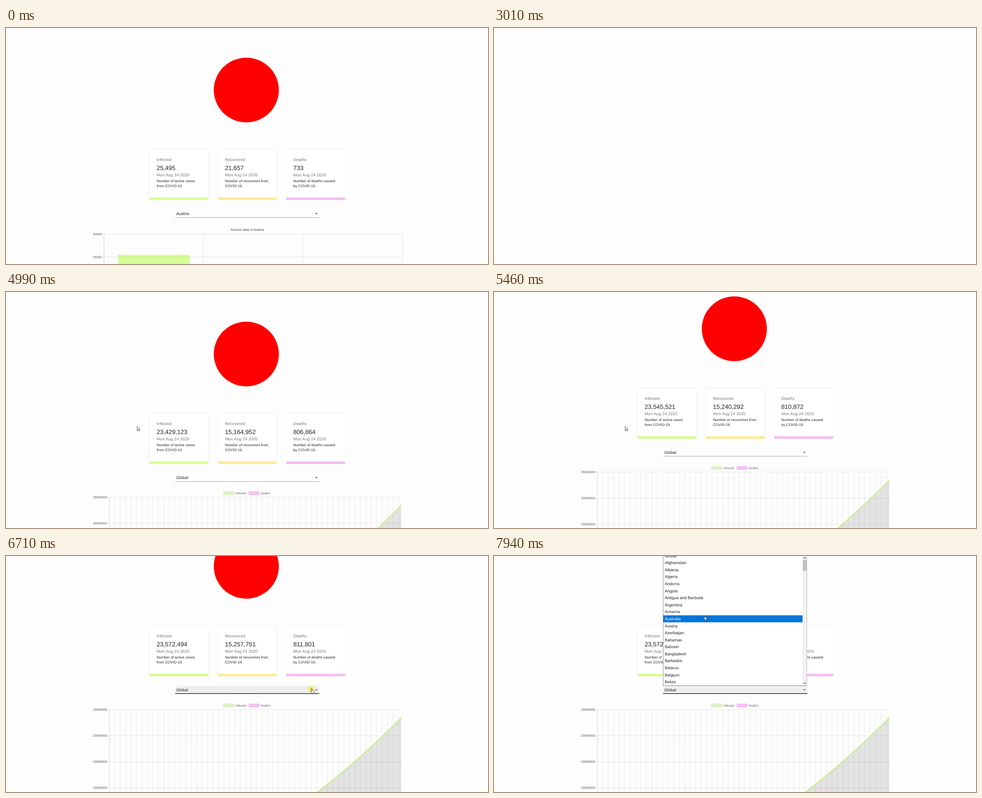
An HTML page that plays this animation: 1067 by 525 pixels, repeating every 8000 ms.

```html
<!DOCTYPE html>
<html lang="en">
<head>
<meta charset="utf-8">
<title>Case dashboard</title>
<style>
  html, body { margin: 0; height: 100%; overflow: hidden; background: #fdfdfd; }
  svg { display: block; width: 1067px; height: 525px; font-family: "Liberation Sans", Arial, sans-serif; text-rendering: geometricPrecision; }
  .label { font-size: 9.1px; letter-spacing: .0094em; fill: #757575; }
  .count { font-size: 13.6px; fill: #212121; }
  .body { font-size: 7.95px; letter-spacing: .0107em; fill: #212121; }
  .item { font-size: 9.05px; fill: #212121; }
  .axis { font-size: 7.1px; fill: #555; text-anchor: end; }
  .legend { font-size: 6.8px; fill: #666; }
  .title { font-size: 6.7px; font-weight: bold; fill: #666; text-anchor: middle; }
  .card { fill: #fff; filter: drop-shadow(0 .6px .6px rgba(0, 0, 0, .3)); }
  .grid { stroke: #000; stroke-opacity: .1; fill: none; }
  .status { font-size: 6.8px; fill: #5f6368; }
</style>
</head>
<body>
<svg viewBox="0 0 1067 525">
  <g id="page">
    <circle cx="532" cy="138" r="72" fill="#f00"/>
    <g id="cards"></g>
    <rect id="focus" x="374.5" y="404" width="319" height="17" fill="#000" fill-opacity=".055"/>
    <text id="choice" class="item" x="377" y="416"></text>
    <path d="M683.8 411.6h6.4l-3.2 3.2z" fill="#757575"/>
    <rect id="line" x="374.5" width="319"/>
    <rect id="blue" y="420.4" height="1.4" fill="#3f51b5"/>
    <g id="austria"></g>
    <g id="global"></g>
  </g>
  <g id="menu">
    <rect x="374.5" y="-5" width="318" height="293.5" fill="#fff" stroke="#8a8a8a"/>
    <rect id="mark" x="375" width="308" height="15.6" fill="#0078d7"/>
    <g id="items"></g>
    <rect x="683" y="0" width="9.5" height="288" fill="#f1f1f1"/>
    <rect x="683.5" y="9" width="8.5" height="24" fill="#c1c1c1"/>
    <path d="M685.3 5.5l2.4-2.4 2.4 2.4M685.3 281.8l2.4 2.4 2.4-2.4" fill="none" stroke="#505050" stroke-width="1.2"/>
  </g>
  <g id="status">
    <rect x="-3" y="515.5" width="149.5" height="15" rx="2" fill="#dee1e6" stroke="#c8cbd0"/>
    <text id="message" class="status" x="3" y="524"></text>
  </g>
  <circle id="click" cx="675" cy="296" r="6.8" fill="#fff04a" fill-opacity=".9"/>
  <g id="cursor" fill="#fff" stroke="#222" stroke-width=".8" stroke-linejoin="round">
    <path id="arrow" d="M.4.4v9.8l2.2-2 1.6 3.2 1.5-.7-1.5-3.1h2.6z"/>
    <path id="hand" d="M2.5-1q1 0 1 1v3.6l4 .8q1 .3.8 2l-.8 4H3L.1 6q0-1 .9-.7l.7 1V0q0-1 .8-1z"/>
  </g>
</svg>
<script>
const $ = id => document.getElementById(id);
const text = (cls, x, y, s) => `<text class="${cls}" x="${x}" y="${y}">${s}</text>`;
const rect = (x, y, w, h, fill, extra = "") =>
  `<rect x="${x}" y="${y}" width="${w}" height="${h}" fill="${fill}" ${extra}/>`;
const show = (id, on) => $(id).style.display = on ? "" : "none";
const clamp = p => Math.min(1, Math.max(0, p));
const smooth = p => (p = clamp(p), p * p * (3 - 2 * p));

const LIME = "#d5ff95", PINK = "#f4bff2";
const cards = [
  { name: "Infected", color: LIME, austria: 25495, global: 23572494, note: ["Number of active cases", "from COVID-19."] },
  { name: "Recovered", color: "#ffeb99", austria: 21657, global: 15257751, note: ["Number of recoveries from", "COVID-19."] },
  { name: "Deaths", color: PINK, austria: 733, global: 811801, note: ["Number of deaths caused", "by COVID-19."] }
];
$("cards").innerHTML = cards.map((c, i) => {
  const left = 317.6 + i * 151.3, x = left + 15.8;
  return `<rect class="card" x="${left}" y="269.7" width="130.6" height="112.9" rx="2"/>` +
    `<path d="M${left} 377h130.6v3.6q0 2-2 2h-126.6q-2 0-2-2z" fill="${c.color}"/>` +
    text("label", x, 295.9, c.name) + text("count", x, 316.2, "") +
    text("label", x, 330.2, "Mon Aug 24 2020") +
    text("body", x, 342.7, c.note[0]) + text("body", x, 354, c.note[1]);
}).join("");
const counts = document.querySelectorAll(".count");

$("austria").innerHTML =
  text("title", 534.2, 450.8, "Current state in Austria") +
  text("axis", 212, 460.6, "30000") + text("axis", 212, 511.8, "25000") +
  rect(248.3, 504.6, 158.5, 200, LIME) +
  `<path class="grid" d="M212 458.5H878M212 509.5H878M217 458.5V700M437 458.5V700M657.5 458.5V700M878 458.5V700"/>` +
  `<path class="grid" d="M217 458.5V700"/>`;

// Cumulative cases in millions, one value per day
const DAYS = 214, X0 = 228.7, STEP = 646.3 / DAYS, TOP = 456.7, ROW = 58.25;
const cases = left => 23.45 - .262 * left + .0005 * left * left;
let grid = "", curve = "", dots = "";
for (let d = 0; d <= DAYS; d++) {
  const x = X0 + d * STEP;
  if (d % 4 == 0) grid += `M${x} ${TOP}V760`;
  if (d < 120) continue;
  const y = TOP + (25 - cases(DAYS - d)) / 5 * ROW;
  curve += `L${x} ${y}`;
  dots += `<circle cx="${x}" cy="${y}" r="1.4"/>`;
}
let labels = "";
for (let i = 0; i < 4; i++) {
  const y = TOP + i * ROW;
  grid += `M224 ${y}H875`;
  labels += text("axis", 224, y + 2, 25e6 - i * 5e6);
}
const lineStart = X0 + 120 * STEP;
$("global").innerHTML =
  rect(481.7, 444.2, 23, 6.8, "#e5e5e5", `stroke="${LIME}" stroke-width="1.5"`) + text("legend", 507.6, 449.7, "Infected") +
  rect(537, 443.5, 24, 8.2, PINK) + text("legend", 563.5, 449.7, "Deaths") +
  labels + `<path class="grid" stroke-width=".9" d="${grid}"/>` +
  `<path class="grid" d="M${X0} ${TOP}V760"/>` +
  `<path d="M${lineStart} 760${curve}V760z" fill-opacity=".1"/>` +
  `<path d="M${curve.slice(1)}" fill="none" stroke="${LIME}" stroke-width="1.5"/>` +
  `<g fill="#b9ee66">${dots}</g>`;

const PITCH = 15.59, rowTop = i => i * PITCH - 8.4;
const items = ("Global,Afghanistan,Albania,Algeria,Andorra,Angola,Antigua and Barbuda,Argentina,Armenia," +
  "Australia,Austria,Azerbaijan,Bahamas,Bahrain,Bangladesh,Barbados,Belarus,Belgium,Belize").split(",");
$("items").innerHTML = items.map((s, i) => text("item", 378, rowTop(i) + 11, s)).join("");
const itemNodes = $("items").children;

// Pointer waypoints: time, x, y
const path = [
  [140, 996, 510], [910, 610, 186], [980, 600, 182], [1520, 166, -14], [4380, 44, -14],
  [4690, 118, 87], [4990, 290, 298], [5950, 290, 298], [6310, 365, 297], [6540, 674, 295],
  [6790, 674, 295], [7470, 489, 140], [7550, 486, 139], [7700, 468, 133], [7860, 468, 133], [7940, 465.5, 133], [8000, 465.5, 133]
];
function pointer(t) {
  const i = path.findIndex(k => k[0] > t);
  if (i < 1) return [-50, -50];
  const [a, b] = [path[i - 1], path[i]], p = (t - a[0]) / (b[0] - a[0]);
  return [a[1] + (b[1] - a[1]) * p, a[2] + (b[2] - a[2]) * p];
}

function draw() {
  const t = performance.now() % 8000;
  const reloaded = t >= 3010, focused = t >= 6699, open = t >= 6785;
  const scroll = 57.5 * (smooth((t - 5070) / 430) + smooth((t - 5540) / 430));
  show("page", !reloaded || t >= 3080);
  $("page").setAttribute("transform", `translate(0 ${-scroll})`);
  show("austria", !reloaded);
  show("global", reloaded);
  $("choice").textContent = reloaded ? "Global" : "Austria";

  // Exponential ease-out count-up
  const p = clamp((t - 3054) / 2710);
  const grow = (1 - 2 ** (-10 * p)) * 1024 / 1023;
  cards.forEach((c, i) => counts[i].textContent =
    Math.round(reloaded ? c.global * grow : c.austria).toLocaleString("en-US"));

  const [x, y] = pointer(t);
  const hover = smooth((t - 6330) / 200);
  $("line").setAttribute("y", 421 - .6 * hover);
  $("line").setAttribute("height", .8 + .6 * hover);
  $("line").setAttribute("fill-opacity", .45 + .42 * hover);
  const half = 159.5 * (1 - (1 - clamp((t - 6699) / 200)) ** 3);
  $("blue").setAttribute("x", 534 - half);
  $("blue").setAttribute("width", 2 * half);
  show("focus", focused);
  show("click", focused && !open);

  show("menu", open);
  const row = y > 285 ? 0 : Math.floor((y + 8.4) / PITCH);
  $("mark").setAttribute("y", rowTop(row));
  [...itemNodes].forEach((n, i) => n.style.fill = i == row ? "#fff" : "");

  show("status", t >= 2610 && !reloaded);
  $("message").textContent = t < 2760 ? "Connecting to the page…" : "Waiting for the page to respond…";

  const onSelect = t > 6320 && !open;
  show("arrow", !onSelect);
  show("hand", onSelect);
  $("cursor").setAttribute("transform", `translate(${x} ${y})`);
  requestAnimationFrame(draw);
}
draw();
</script>
</body>
</html>
```
